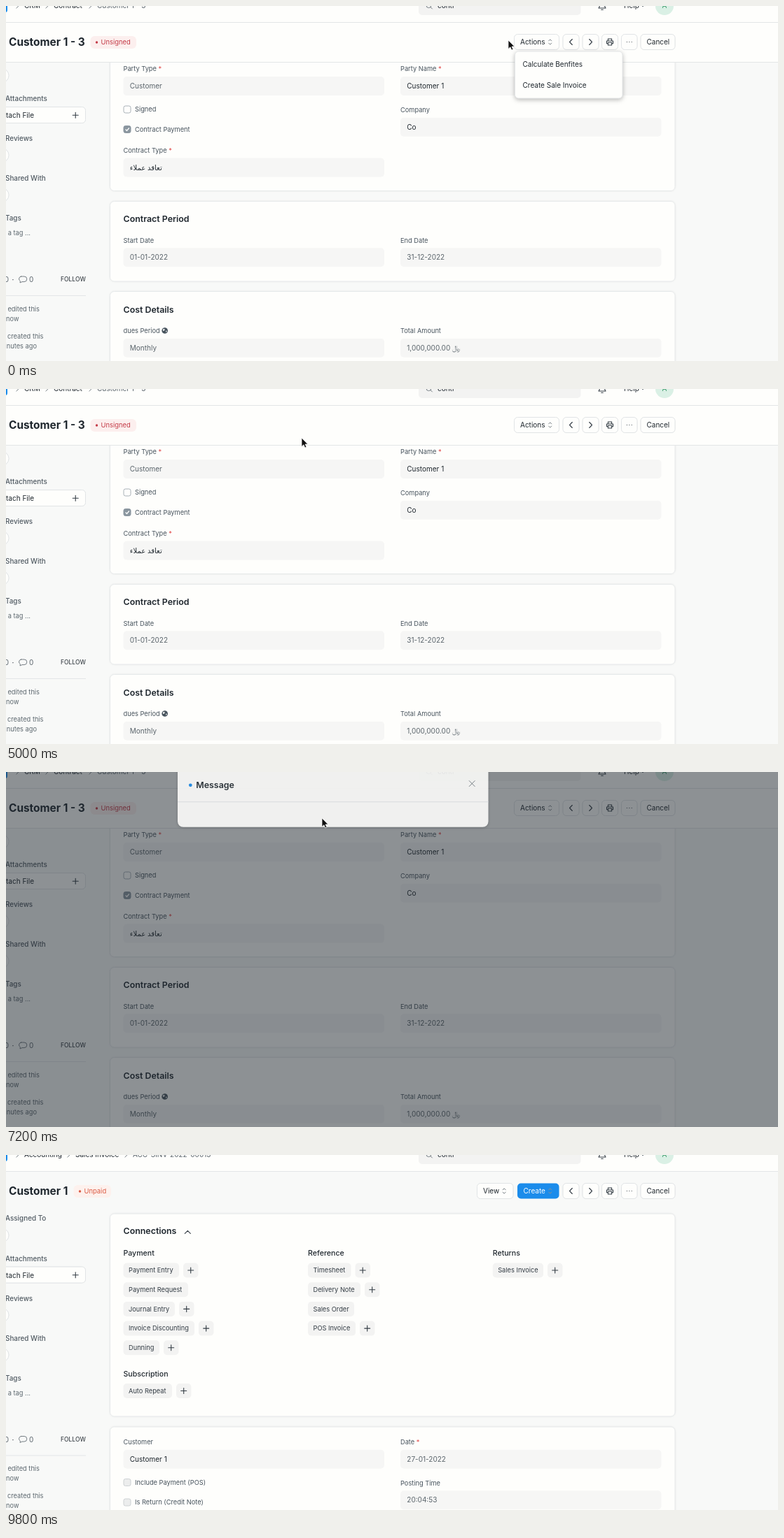
Animation, 1102 px wide and 508 px high, one loop 9.9 s. Source, as an HTML page:

```html
<!DOCTYPE html>
<html lang="en">
<head>
<meta charset="utf-8">
<title>Contract to invoice</title>
<style>
html, body { margin: 0; width: 100%; height: 100%; overflow: hidden; background: #f8f9f8; }
svg { display: block; width: 100vw; height: 100vh; font: 10px Inter, "DejaVu Sans", sans-serif; }
text { fill: #1f272e; white-space: pre; }
.label { font-size: 9.25px; fill: #47535d; }
.small { font-size: 9.25px; fill: #5d686f; }
.chip { font-size: 9.25px; fill: #333c44; }
.value { fill: #5a646b; }
.head { font-size: 12.4px; font-weight: 600; }
.sub { font-size: 10.6px; font-weight: 500; }
.side { font-size: 9.9px; font-weight: 500; fill: #505a62; }
.title { font-size: 15.4px; font-weight: 700; }
.badge { font-size: 9.4px; }
.follow { font-size: 8.5px; }
.msg { font-size: 10.7px; }
.end { text-anchor: end; }
.mid { text-anchor: middle; }
.bold { font-weight: 600; }
.red { fill: #e24c4c; }
.line { fill: none; stroke: #333c44; stroke-width: 1.1; stroke-linecap: round; stroke-linejoin: round; }
.soft { stroke: #687178; stroke-width: .9; }
.card { fill: #fefefc; stroke: #e6e9ea; filter: drop-shadow(0 .6px .8px #0001); }
.btn { fill: #fefefc; stroke: #e1e4e6; filter: drop-shadow(0 .6px .6px #0001); }
.blue { fill: #1b8ceb; }
.field { fill: #f6f6f5; }
.tile { fill: #f3f3f2; }
.rule { stroke: #e3e6e7; }
</style>
</head>
<body>
<svg id="stage" viewBox="0 0 1102 508" preserveAspectRatio="none"></svg>
<script>
const text = (x, y, s, cls = '') => `<text x="${x}" y="${y}" class="${cls}">${s}</text>`;
const rect = (x, y, w, h, r, cls) => `<rect x="${x}" y="${y}" width="${w}" height="${h}" rx="${r}" class="${cls}"/>`;
const path = (x, y, d, cls = '') => `<path transform="translate(${x} ${y})" d="${d}" class="line ${cls}"/>`;
const group = (id, s) => `<g id="${id}">${s}</g>`;
const rule = (x1, x2, y) => `<path class="rule" d="M${x1} ${y}H${x2}"/>`;
const card = (y, h) => rect(148.5, y, 806.5, h, 6, 'card');

const icon = {
  plus: 'M-4 0H4M0-4V4',
  sort: 'M-2-1.6L0-3.7L2-1.6M-2 1.6L0 3.7L2 1.6',
  left: 'M1.8-4L-2 0L1.8 4',
  right: 'M-1.8-4L2 0L-1.8 4',
  crumb: 'M-1.4-3L1.6 0L-1.4 3',
  up: 'M-4 2L0-2L4 2',
  down: 'M-2-1L0 1L2-1',
  cross: 'M-4-4L4 4M4-4L-4 4',
  print: 'M-2.6-1.5V-4.5H2.6V-1.5M-2.6 2.3H-4.5V-1.5H4.5V2.3H2.6M-2.6 .8H2.6V4.5H-2.6Z',
  dots: 'M-3.4 0h.1M0 0h.1M3.4 0h.1',
  bubble: 'M-2.5-4H2A3.6 3.6 0 0 1 2 3.6H-1L-4 5L-3.6 2.7A3.6 3.6 0 0 1-2.5-4Z',
  bell: 'M-5 3H5L3.8 1V-3A3.8 3.8 0 0 0-3.8-3V1ZM-1.3 5.2H1.3'
};

const star = '<tspan class="red"> *</tspan>';
function field(col, y, label, value, cls = 'value') {
  const x = col ? 563 : 167.5;
  return text(x, y, label, 'label') + rect(x, y + 7.8, 372.5, 27, 5, 'field') +
    text(x + 9.3, y + 24.9, value, cls);
}
function check(y, label, fill, stroke, tick) {
  return `<rect x="168" y="${y - 5}" width="10" height="10" rx="2.5" fill="${fill}" stroke="${stroke}"/>` +
    (tick ? `<path d="M170.6 ${y}l1.9 2 3.3-4" fill="none" stroke="#fff" stroke-width="1.2"/>` : '') +
    text(184, y + 3.3, label, 'label');
}
function chip(x, right, row, label, add = true) {
  const y = 154.5 + row * 27.7;
  return rect(x, y, right - x, 21, 5, 'tile') + text(x + 7.5, y + 13.8, label, 'chip') +
    (add ? rect(right + 6, y, 21.5, 21, 5, 'tile') + path(right + 16.7, y + 10.5, icon.plus) : '');
}
function button(x, right, label, glyph, cls = 'btn') {
  const blue = cls == 'blue', style = blue ? ' style="fill:#fff"' : '';
  return rect(x, 40.5, right - x, 22, 5, cls) +
    (label ? `<text x="${x + 8.5}" y="55"${style}>${label}</text>` : '') +
    (glyph ? `<g${blue ? ' style="filter:invert(1)"' : ''}>` +
      path(label ? right - 12.8 : (x + right) / 2, 51.5, icon[glyph], label ? 'soft' : '') + '</g>' : '');
}
const title = (name, x, w, state, back, ink) => text(4, 56.6, name, 'title') +
  `<rect x="${x}" y="43" width="${w}" height="18" rx="6" fill="${back}"/>` +
  `<circle cx="${x + 9}" cy="52" r="1.7" fill="${ink}"/>` +
  `<text x="${x + 15}" y="55.4" class="badge" style="fill:${ink}">${state}</text>`;
const crumbs = (...list) => list.map(([x, s], i) =>
  path(x - 9.7, 0, icon.crumb, 'soft') + text(x, 3, s, i == 2 ? 'value' : '')).join('');

function sidebar(dy, created) {
  const bold = s => `<tspan class="bold">${s}</tspan>`;
  const ring = y => `<circle cx="-6" cy="${y}" r="10" class="btn"/>` + path(-6, y, icon.plus);
  return `<g transform="translate(0 ${dy})">` +
    [['Assigned To', 78.5], ['Attachments', 136], ['Reviews', 193], ['Shared With', 250], ['Tags', 307]]
      .map(([s, y]) => text(-1, y, s, 'side')).join('') +
    [99.5, 213.5, 270.5].map(ring).join('') +
    rect(-40, 144.5, 153.5, 23, 5, 'btn') + text(40, 160, 'Attach File', 'end') + path(99.2, 156.2, icon.plus) +
    text(35, 328, 'Add a tag ...', 'small end') +
    text(4, 395, '0', 'value end') + text(8.5, 395, '·') + path(24, 391, icon.bubble, 'soft') +
    text(33, 395, '0', 'value') + text(78, 394.2, 'FOLLOW', 'follow') + rule(-10, 114, 414.5) +
    text(48, 436.5, bold('You') + ' edited this', 'small end') + text(18.5, 450.5, 'just now', 'small end') +
    text(53.5, 475.5, bold('You') + ' created this', 'small end') + text(...created, 'small end') + '</g>';
}

const contract = sidebar(0, [44, 489.5, '5 minutes ago']) +
  card(60, 204.5) + card(279.5, 114.5) + card(408.5, 130) +
  field(0, 93.3, 'Party Type' + star, 'Customer') +
  field(1, 93.3, 'Party Name' + star, 'Customer 1', '') +
  check(148, 'Signed', '#fefefc', '#a8b0b7') +
  check(176.5, 'Contract Payment', '#8a969f', '#8a969f', true) +
  field(1, 152, 'Company', 'Co', '') +
  field(0, 209.8, 'Contract Type' + star, 'تعاقد عملاء', '') +
  text(167.5, 309.3, 'Contract Period', 'head') +
  field(0, 338.5, 'Start Date', '01-01-2022') + field(1, 338.5, 'End Date', '31-12-2022') +
  text(167.5, 438.8, 'Cost Details', 'head') +
  field(0, 468, 'dues Period', 'Monthly') + field(1, 468, 'Total Amount', '1,000,000.00 ﷼') +
  '<circle cx="226.7" cy="464.5" r="4.3" fill="#47535d"/><path d="M224 462l3 .3-1 2.4-2 .3zM228 464.5l2 .4-1.6 2.4z" fill="#e6e8e8"/>' +
  '<path d="M-10 24H1120V80H-10Z" fill="#fefefc"/>' + rule(-10, 1120, 80.5) +
  title('Customer 1 - 3', 120.5, 65.5, 'Unsigned', '#fcefee', '#c43c48') +
  button(725.5, 789.5, 'Actions', 'sort') +
  crumbs([26, 'CRM'], [68, 'Contract'], [130, 'Customer 1 - 3']);

const invoice = sidebar(15.5, [18.5, 489.5, 'just now']) +
  title('Customer 1', 96.5, 53.5, 'Unpaid', '#fdf1ed', '#dc5c45') +
  crumbs([26, 'Accounting'], [99, 'Sales Invoice'], [181, 'ACC-SINV-2022-00013']);

const details = button(672.5, 724, 'View', 'sort') + button(730, 789.5, 'Create', 'sort', 'blue') +
  card(84, 290) + card(389, 150) +
  text(167.5, 113.3, 'Connections', 'head') + path(259.3, 110.3, icon.up) +
  text(167.5, 144.2, 'Payment', 'sub') + text(431, 144.2, 'Reference', 'sub') +
  text(694.7, 144.2, 'Returns', 'sub') + text(167.5, 317, 'Subscription', 'sub') +
  chip(167.5, 247, 0, 'Payment Entry') + chip(167.5, 260, 1, 'Payment Request', false) +
  chip(167.5, 241, 2, 'Journal Entry') + chip(167.5, 269, 3, 'Invoice Discounting') +
  chip(167.5, 219, 4, 'Dunning') + chip(167.5, 237, 6.23, 'Auto Repeat') +
  chip(431, 492.5, 0, 'Timesheet') + chip(431, 506, 1, 'Delivery Note') +
  chip(431, 497, 2, 'Sales Order', false) + chip(431, 499, 3, 'POS Invoice') +
  chip(694.7, 767, 0, 'Sales Invoice') +
  field(0, 414, 'Customer', 'Customer 1', '') + field(1, 414, 'Date' + star, '27-01-2022') +
  check(468.5, 'Include Payment (POS)', '#eceded', '#cdd1d3') +
  check(497, 'Is Return (Credit Note)', '#eceded', '#cdd1d3') +
  field(1, 472.5, 'Posting Time', '20:04:53');

const bar = '<path d="M-10 0H1120V23H-10Z" fill="#fefefc"/>' + rule(-10, 1120, 23.5) +
  rect(-20, -14, 22, 23, 3, 'blue') + rect(589, -15, 231.5, 28, 5, 'tile') +
  '<circle cx="603.5" cy="-1" r="3.6" class="line soft"/>' + path(606, 1.6, 'M0 0L2.4 2.4', 'soft') +
  text(616, 3, 'contr') + path(851, 0, icon.bell) + text(882, 3, 'Help') + path(909, 0, icon.down, 'soft') +
  '<circle cx="940" cy="0" r="13" fill="#daf0e5"/><text x="940" y="3" class="mid" style="fill:#3c9b6b">A</text>';
const tools = button(795, 818) + path(806.5, 51.5, icon.left) + button(823, 846) + path(834.5, 51.5, icon.right) +
  button(850.5, 873.5, '', 'print') + button(878.5, 901, '', 'dots') + button(906, 955, 'Cancel');

const menu = '<rect x="726.5" y="65" width="153.5" height="67" rx="5" fill="#fefefc" stroke="#e4e6e7" style="filter:drop-shadow(0 2px 3px #0004)"/>' +
  '<rect id="hover" x="730" width="146.5" height="30.5" rx="4" class="tile"/>' +
  text(737.5, 86.6, 'Calculate Benfites') + text(737.5, 117.4, 'Create Sale Invoice');

const modal = '<rect id="box" x="245" y="-20" width="443.5" rx="8" fill="#fefefc" style="filter:drop-shadow(0 1px 2px #0003)"/>' +
  rule(245, 688.5, 46.5) + '<circle cx="263.3" cy="22.5" r="2.4" class="blue"/>' +
  text(271.3, 26.8, 'Message', 'head') + path(665.2, 20.3, icon.cross, 'soft') +
  group('note', text(260.5, 71, 'invoice created successfuly <tspan text-decoration="underline">ACC-SINV-2022-00013</tspan>', 'msg'));

const cursor = '<path id="arrow" d="M0 0V12.4L2.9 9.8L4.8 14L6.9 13L5 9H8.8Z" fill="#111" stroke="#fff" stroke-width=".7"/>' +
  '<path id="hand" d="M-1.2 .8Q0-1 1.2 .8V5L6 6Q7.4 6.4 7.2 8L6.3 13.6H-.6L-4 8.8Q-3.6 7-1.2 8.6Z" fill="#fff" stroke="#222" stroke-width="1"/>';

const $ = id => document.getElementById(id);
$('stage').innerHTML = group('page',
  '<path d="M-10 0H1120V508H-10Z" fill="#f8f9f8"/>' +
  group('bar', bar) + group('contract', contract) + group('invoice', invoice) +
  group('details', details) + tools + group('menu', menu)) +
  '<rect id="dim" width="1102" height="508" fill="#1f272e"/>' +
  group('modal', modal) + group('cursor', cursor);

// Pointer moves: start, end, target x, target y
const moves = [
  [0, 200, 745, 46], [300, 400, 673, 48], [600, 900, 565, 70], [900, 1000, 582, 66],
  [1100, 1200, 811, 90], [1300, 1400, 747, 108], [1900, 2100, 811, 110], [2200, 2300, 709, 67],
  [2400, 2500, 694, 60], [2500, 2700, 770, 104], [4100, 4200, 744, 100], [4400, 4600, 527, 68],
  [4800, 5000, 422, 70], [5100, 5300, 363, 62], [5400, 5700, 391.5, 80], [5700, 6100, 450, 63],
  [6400, 6600, 451, 66], [7400, 7600, 310, 31]
];
function pointer(t) {
  let x = 717, y = 49;
  for (const [a, b, tx, ty] of moves) {
    const k = Math.min(1, Math.max(0, (t - a) / (b - a)));
    x += (tx - x) * k;
    y += (ty - y) * k;
  }
  return [x, y];
}
function ramp(t, ...pts) {
  let [at, v] = pts[0];
  for (const [b, w] of pts) {
    if (t < b) return t <= at ? v : v + (w - v) * (t - at) / (b - at);
    [at, v] = [b, w];
  }
  return v;
}
const show = (id, on) => $(id).style.display = on ? '' : 'none';
const shift = (id, x, y) => $(id).setAttribute('transform', `translate(${x} ${y})`);

function draw(now) {
  const t = Math.floor(now % 9900 / 100) * 100; // ten pictures a second
  const [x, y] = pointer(t);
  const dx = t >= 5400 && t < 7200 ? 4.5 : 0;
  const inMenu = t < 4200 && x > 727 && x < 880 && y > 66 && y < 132;
  const onButton = x > 726 && x < 790 && y > 40 && y < 63;
  const onLink = t > 5900 && t < 7200 && y > 60 && y < 74;
  const hand = inMenu || onButton || onLink;

  show('contract', t < 8200);
  show('invoice', t >= 8200);
  show('details', t >= 9800);
  show('menu', t < 3900);
  show('hover', inMenu);
  $('hover').setAttribute('y', y < 98 ? 68 : 98.5);
  shift('page', dx, 0);

  $('dim').style.opacity = ramp(t, [5100, 0], [5300, .33], [5400, .5], [7250, .5], [7400, .1], [7500, 0]);
  $('modal').style.opacity = ramp(t, [5300, 0], [5600, 1], [7100, 1], [7200, .88], [7300, .2], [7350, 0]);
  shift('modal', dx, ramp(t, [5300, -38], [5500, -10], [5700, 0], [7100, 0], [7200, -3.7], [7300, -30]));
  show('note', t < 7200);
  $('box').setAttribute('height', t < 7200 ? 107 : 102.5);

  show('cursor', t < 7900);
  show('hand', hand);
  show('arrow', !hand);
  shift('cursor', x, y);
  requestAnimationFrame(draw);
}
draw(0);
</script>
</body>
</html>
```
